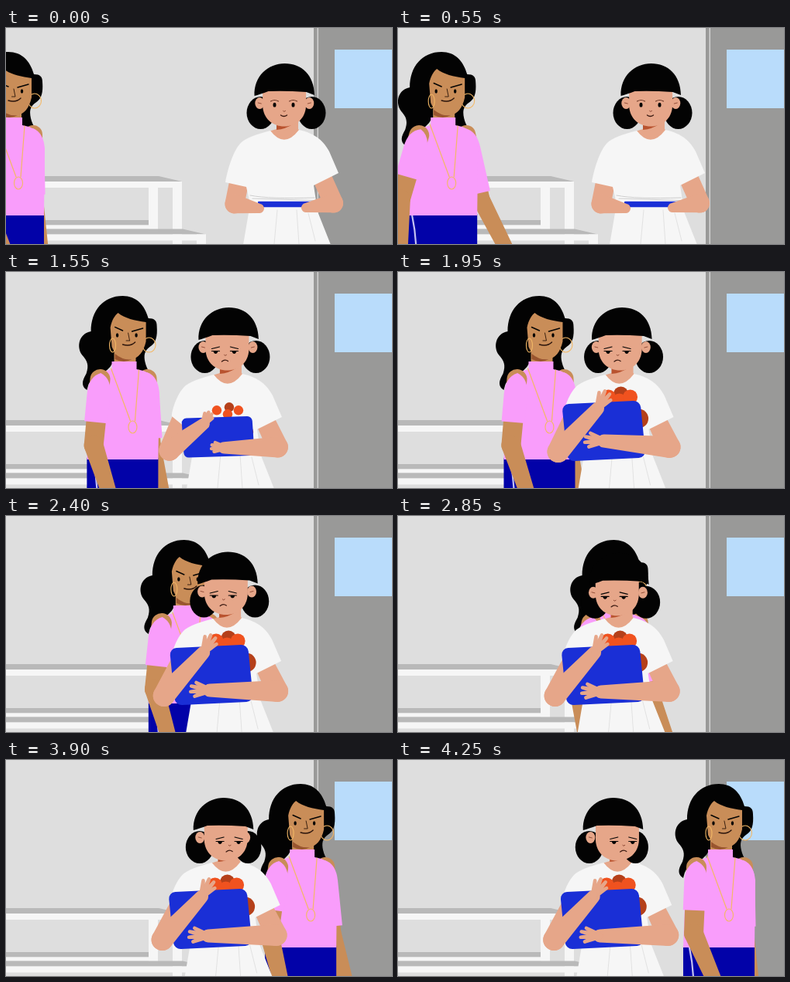
These frames come from a looping animation (498 px wide and 280 px high, 4.3 s). An HTML page with a canvas:

```html
<!DOCTYPE html>
<html lang="en">
<head>
<meta charset="utf-8">
<title>Hallway</title>
<style>
  html, body { margin: 0; width: 100%; height: 100%; overflow: hidden; background: #dedede; }
  canvas { display: block; width: 498px; height: 280px; }
</style>
</head>
<body>
<canvas id="stage" width="498" height="280"></canvas>
<script>
const ctx = document.getElementById('stage').getContext('2d');
const LOOP = 4300, STEP = 50, PI = Math.PI;
const C = {
  wall: '#dedede', door: '#999998', glass: '#b9dcfb', shelf: '#b9b9b9', white: '#f6f6f6',
  hair: '#030303', pink: '#f99dfb', navy: '#0202a8', tan: '#c98d58', tanShade: '#99552f',
  gold: '#f3b866', skin: '#e6a689', shade: '#b9532f', blue: '#1a2fd6', orange: '#f0521f', rust: '#b5401a'
};

// Easing: ramp goes 0 to 1 between a and b, bump goes 0 to 1 to 0
const unit = (t, a, b) => Math.min(1, Math.max(0, (t - a) / (b - a)));
const ramp = (t, a, b) => (1 - Math.cos(PI * unit(t, a, b))) / 2;
const bump = (t, a, b) => Math.sin(PI * unit(t, a, b)) ** 2;
const mix = (a, b, u) => a + (b - a) * u;
const mixPt = (a, b, u) => [mix(a[0], b[0], u), mix(a[1], b[1], u)];
const polar = ([x, y], a, r) => [x + r * Math.sin(a), y + r * Math.cos(a)];

function pose(t) {
  const body = Math.max(65 - .06 * t, -6.5 - .001 * t);
  const lift = bump(t, 1300, 2600);
  return {
    walk: -110 + .0967 * t + 4 * bump(t, 600, 1500) - 9.5 * bump(t, 1300, 2800),
    tilt: bump(t, 600, 1600),
    swing: -1 + 2 * ramp(t, 0, 550) - 1.6 * ramp(t, 550, 1700) + 1.4 * ramp(t, 2100, 3400) - 1.8 * ramp(t, 3500, 4250),
    body, lift,
    hug: ramp(t, 1250, 1750),
    sad: t > 1500,
    headX: 294.5 + body + 3 * lift - 6 * ramp(t, 3500, 4250),
    headY: 3 * ramp(t, 2000, 3500),
    turn: -1 - 5 * ramp(t, 1200, 1700) + 19 * ramp(t, 3300, 4250)
  };
}

function fill(d, color) {
  ctx.fillStyle = color;
  ctx.fill(new Path2D(d));
}
function line(d, color, width) {
  ctx.strokeStyle = color;
  ctx.lineWidth = width;
  ctx.stroke(new Path2D(d));
}
function rect(x, y, w, h, color) {
  ctx.fillStyle = color;
  ctx.fillRect(x, y, w, h);
}
function oval(x, y, rx, ry, color) {
  ctx.fillStyle = color;
  ctx.beginPath();
  ctx.ellipse(x, y, rx, ry, 0, 0, 2 * PI);
  ctx.fill();
}
function ring(x, y, rx, ry) {
  ctx.strokeStyle = C.gold;
  ctx.lineWidth = 1.1;
  ctx.beginPath();
  ctx.ellipse(x, y, rx, ry, 0, 0, 2 * PI);
  ctx.stroke();
}
function shifted(x, y, draw) {
  ctx.save();
  ctx.translate(x, y);
  draw();
  ctx.restore();
}

// Tapered segment with round ends
function limb([x0, y0], [x1, y1], w0, w1, color) {
  const a = Math.atan2(y1 - y0, x1 - x0), q = PI / 2;
  ctx.fillStyle = color;
  ctx.beginPath();
  ctx.arc(x0, y0, w0 / 2, a + q, a - q);
  ctx.arc(x1, y1, w1 / 2, a - q, a + q);
  ctx.fill();
}

function bench(y, right) {
  fill(`M0 ${y}H${right - 30}L${right} ${y + 7}H0Z`, C.shelf);
  rect(0, y + 7, right, 8, C.white);
  for (const x of [right - 43, right - 12]) rect(x, y + 7, 12, 62, C.white);
}

function room() {
  rect(0, 0, 498, 280, C.wall);
  rect(397, 0, 101, 280, C.door);
  rect(401.5, 0, 1.5, 280, '#d2d2d2');
  rect(424, 28, 74, 76, C.glass);
  bench(192, 227);
  rect(0, 249, 184, 6.5, C.shelf);
  rect(0, 255.5, 184, 5, C.white);
  bench(260.5, 258);
}

function sleevedArm(shoulder, upper, fore, sleeve, w) {
  const elbow = polar(shoulder, upper, 86);
  limb(shoulder, elbow, w - 4, w - 5, C.tan);
  limb(elbow, polar(elbow, fore, 75), w - 5, 19, C.tan);
  shifted(...shoulder, () => {
    const h = w / 2;
    ctx.rotate(-upper);
    fill(`M${-h} 20Q${-h} -2 0 -8Q${h} -2 ${h} 20V${sleeve}H${-h}Z`, C.pink);
  });
}

function walkerFace() {
  ring(147, 94.5, 8.5, 9.5);
  fill('M102 95H130V119H102Z', C.tan);
  fill('M103 106Q114 115 125 113Q115 119 103 113Z', C.tanShade);
  fill('M97 72C99 62 103 56 107 53C115 60 129 63 143 65V90C140 104 133 112 124 113C111 112 103 107 99 97Z', C.tan);
  line('M103 71.5L113 76M125 77L139 73', C.hair, 1.4);
  for (const x of [106, 130.5]) oval(x, 82, 1.7, 2.8, C.hair);
  line('M120 79L122 89L117.5 89', '#3a2010', 1);
  line('M113 94Q123 97 129 91', '#2a140c', 1.4);
  ring(100, 95, 4, 9);
}

function walker({ walk, tilt, swing: s }) {
  const nod = draw => shifted(115, 117, () => {
    ctx.rotate(.08 * tilt);
    ctx.translate(-115, -117);
    draw();
  });
  const lean = draw => {
    ctx.save();
    ctx.transform(1, 0, -.04 * tilt, 1, 4.7 * tilt, 0);
    draw();
    ctx.restore();
  };
  shifted(walk, 0, () => {
    nod(() => fill('M72 77C72 50 88 31 113 31C130 31 141 42 146 60C154 60 157 63 157 70' +
      'C158 84 156 92 148 97C141 102 140 108 142 117Q144 126 149 131C138 133 130 130 122 120' +
      'L100 118Q94 130 82 132Q70 137 67 153C58 147 62 139 66 132C70 120 67 115 61 108C53 98 56 80 72 77Z', C.hair));
    lean(() => {
      sleevedArm([145, 138], .12 + .1 * s, .3 + .17 * s, 78, 28);
      rect(67, 241, 92, 40, C.navy);
      line('M75 243Q79 262 80 281', '#c4c2f2', 2.2);
    });
    nod(walkerFace);
    lean(() => {
      fill('M99 116H131V126C149 129 159 138 160 156L159 243H67L70 160C68 143 77 132 99 126Z', C.pink);
      line('M98 125L123 193M134 127L129 193', C.gold, 1.2);
      ring(126, 201, 5.5, 8);
      sleevedArm([84, 139], -.16 - .12 * s, .2 - .21 * s, 56, 30);
    });
  });
}

function folder(p) {
  const w = mix(72, 101, p), h = mix(7.5, 74, p);
  ctx.save();
  ctx.transform(1, -.05 * p, .1 * p, 1, mix(296, 274, p), mix(228.5, 206, p));
  ctx.fillStyle = C.blue;
  ctx.beginPath();
  ctx.roundRect(-w / 2, -h / 2, w, h, mix(1, 9, p));
  ctx.fill();
  ctx.restore();
}

function hand(wrist, dir, size) {
  for (let i = 0; i < 4; i++) {
    const tip = polar(wrist, dir + (i - 1.5) * .3, size * (20 + 5 * Math.sin(i)));
    limb(wrist, tip, 8, 4.6, C.skin);
  }
}

function prints(p) {
  const dot = (x, y, r, color) => oval(x, y + 50 * (1 - p), r * p, r * p, color);
  dot(296, 158, 9.5, C.rust);
  for (let i = 0; i < 3; i++) dot(280 + 14 * i, i === 1 ? 167 : 162, 9.5, C.orange);
  dot(319, 190, 12.5, C.rust);
}

function papers(alpha) {
  ctx.globalAlpha = alpha;
  fill('M250 217L275 219L333 222L335 225H256Z', '#fafafa');
  line('M250 217Q275 222 333 220M253 221L333 223.5', '#cccccc', 1);
  ctx.globalAlpha = 1;
}

function carrierBody({ hug: p, lift }) {
  const elbowL = mixPt([230, 228], [212 + 3 * lift, 233], p);
  const handL = mixPt([262, 234], [263 + 3 * lift, 177], p);
  const elbowR = mixPt([357.5, 227], [359, 227], p);
  const handR = mixPt([322, 233], [271 + 3 * lift, 228 - 9 * lift], p);
  const cuff = mixPt([218, 200], [224, 180], p);
  const thick = mix(25, 28, p), wrist = mix(12, 17, p);

  limb([240, 178], elbowL, 25, thick, C.skin);
  limb([341, 190], elbowR, 25, thick, C.skin);
  fill('M284 116H312V131L315 134Q294 162 274 134L284 131Z', C.skin);
  fill('M284 124H306Q296 131 284 132Z', C.shade);
  fill('M276 133Q294 157 313 132C335 137 345 147 352 160L364 188L332 204L337 238L354 281H241L250 228' +
    `L245 206L${cuff}C222 178 230 155 240 147C250 140 265 136 276 133Z`, C.white);
  line('M285 236L281 280M310 236L313 280M325 240L334 276', '#e2e2e2', 1);

  if (p < .5) papers(1 - 2 * p);
  prints(p);
  folder(p);
  limb(elbowL, handL, thick, wrist, C.skin);
  hand(handL, 2.6, p);
  limb(elbowR, handR, thick, wrist, C.skin);
  hand(handR, -1.65, p);
}

function carrierFace(sad) {
  for (const side of [-1, 1]) {
    const x = 12 * side;
    if (sad) {
      line(`M${x + 5 * side} 99.5L${x - 5 * side} 97`, C.hair, 1.2);
      line(`M${x - 5} 102.5H${x + 5}`, C.hair, 1.2);
      fill(`M${x - 2.8} 102.5H${x + 2.8}C${x + 2.8} 107 ${x - 2.8} 107 ${x - 2.8} 102.5Z`, C.hair);
    } else {
      line(`M${x - 5} 95Q${x} 92 ${x + 5} 95`, '#6b3626', 1.1);
      oval(x, 99.7, 2, 2.9, C.hair);
    }
  }
  line('M-1 107.5Q0 109.5 2 107.5', '#8a4632', 1);
  line(sad ? 'M-4 116Q0 112.5 4 115.5' : 'M-4 113Q0 116 4 113', '#3a1a12', 1.3);
}

function carrierHead({ headX, headY, turn: s, sad }) {
  const away = Math.max(0, s);
  shifted(headX, headY, () => {
    oval(-31, 110, 18, 21, C.hair);
    oval(35 - .5 * away, 110, 18 - .1 * away, 21, C.hair);
    for (const side of [-1, 1]) {
      const x = 32 * side + .2 * s - (side > 0 ? .7 * away : 0);
      oval(x, 97.5, 6, 7.5, C.skin);
      line(`M${x + 2 * side} 97L${x - 2 * side} 98`, '#8a4632', .9);
    }
    shifted(.4 * s, 0, () => fill('M-28 78H28V101C27 118 15 127.5 0 127.5C-16 127.5 -27 117 -28 101Z', C.skin));
    fill('M-39 88C-40 62 -21 46 0 46C22 46 38 61 38.5 87L28 83Q0 81 -21 82Q-32 86 -39 88Z', C.hair);
    shifted(s, 0, () => carrierFace(sad));
  });
}

function frame(now) {
  const now0 = pose(Math.floor(now % LOOP / STEP) * STEP);
  room();
  walker(now0);
  shifted(now0.body, 0, () => carrierBody(now0));
  carrierHead(now0);
}

ctx.lineJoin = ctx.lineCap = 'round';
const start = performance.now();
function tick() {
  frame(performance.now() - start);
  requestAnimationFrame(tick);
}
tick();
</script>
</body>
</html>
```
